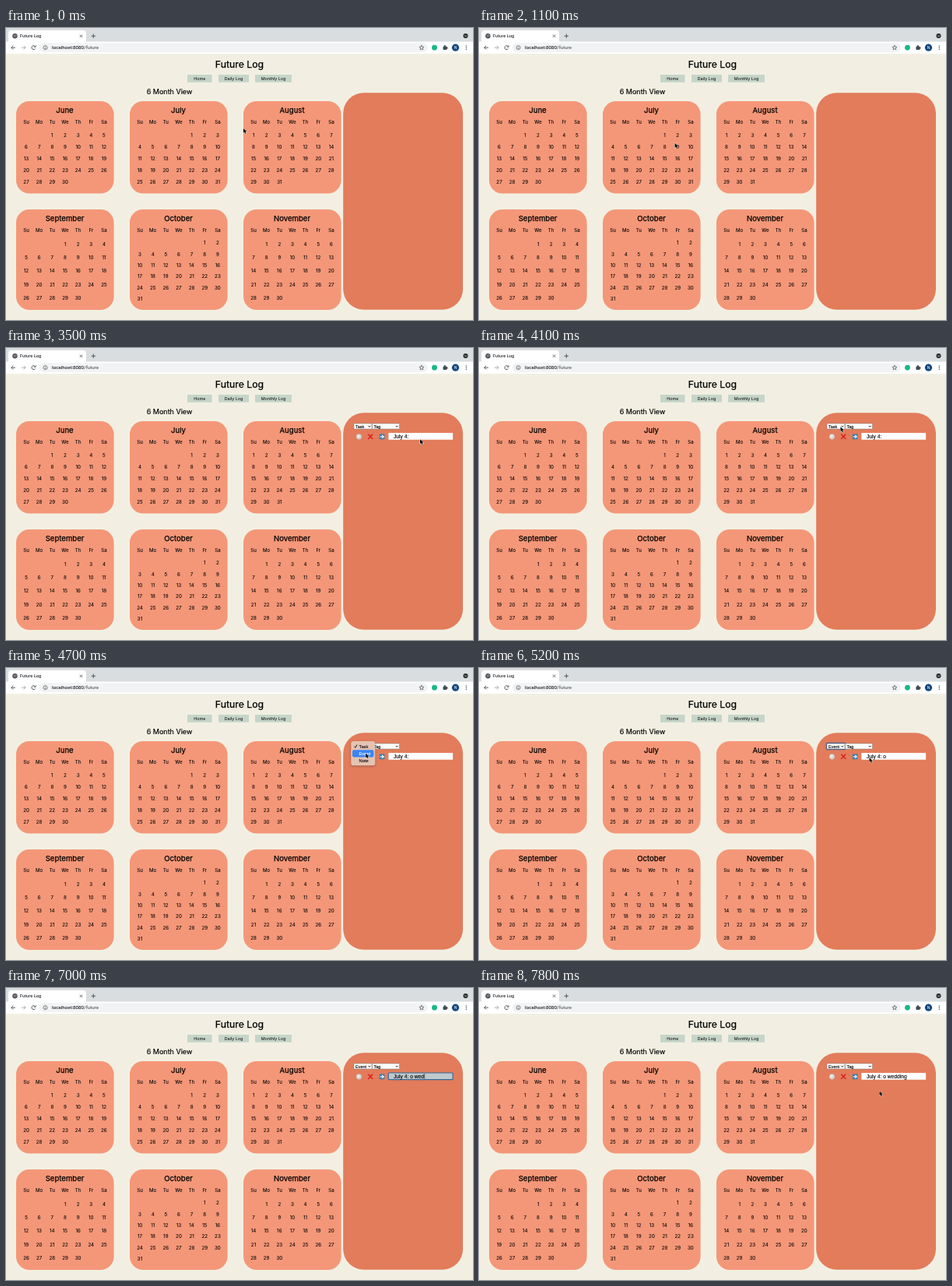
Animation, 600 px wide and 375 px high, one loop 8000 ms. Source, as an HTML page with a canvas:

```html
<!DOCTYPE html>
<html lang="en">
<head>
<meta charset="utf-8">
<title>Future Log</title>
<style>
html, body { margin: 0; width: 100%; height: 100%; overflow: hidden; background: #f2efe2; }
canvas { display: block; width: 600px; height: 375px; }
</style>
</head>
<body>
<canvas id="stage"></canvas>
<script>
const canvas = document.getElementById('stage');
const c = canvas.getContext('2d');
const ratio = window.devicePixelRatio || 1;
canvas.width = 600 * ratio;
canvas.height = 375 * ratio;

const LOOP = 8000, STEP = 100;
const PAGE = 'Inter, sans-serif';
const UI = '"Liberation Sans", Arial, sans-serif';
const CHROME = 'Roboto, sans-serif';

function box(x, y, w, h, r, fill, stroke, lw = 0.5) {
  c.beginPath();
  c.roundRect(x, y, w, h, r);
  if (fill) { c.fillStyle = fill; c.fill(); }
  if (stroke) { c.strokeStyle = stroke; c.lineWidth = lw; c.stroke(); }
}

function disc(x, y, r, fill) {
  c.beginPath();
  c.arc(x, y, r, 0, Math.PI * 2);
  c.fillStyle = fill;
  c.fill();
}

function line(points, color, lw = 0.9) {
  c.beginPath();
  points.forEach(([x, y]) => c.lineTo(x, y));
  c.strokeStyle = color;
  c.lineWidth = lw;
  c.stroke();
}

// y is the baseline; weight adds a thin outline
function text(s, x, y, size, font, { align = 'left', color = '#000', weight = 0 } = {}) {
  c.font = `${size}px ${font}`;
  c.textAlign = align;
  c.fillStyle = color;
  c.fillText(s, x, y);
  if (weight) {
    c.strokeStyle = color;
    c.lineWidth = weight;
    c.strokeText(s, x, y);
  }
}

const centered = { align: 'center', weight: 0.08 };
const heading = { align: 'center', weight: 0.25 };
const bold = { weight: 0.12 };

function drawBrowser() {
  const ink = '#484c50';
  box(0, 0, 600, 18, 0, '#d9dddf');
  box(3, 3, 100, 18, 4, '#fff');
  box(0, 17.5, 600, 15.5, 0, '#fff');
  disc(11.5, 10.3, 3.2, '#4d5156');
  line([[9.5, 9], [11.5, 10], [11, 12]], '#c4c7ca', 0.7);
  line([[12, 8.2], [13.6, 10.6]], '#c4c7ca', 0.7);
  text('Future Log', 17.8, 12.3, 5.8, CHROME, { color: '#2c3033', weight: 0.1 });
  line([[94.8, 8.6], [98.2, 12]], ink, 0.8);
  line([[98.2, 8.6], [94.8, 12]], ink, 0.8);
  line([[109.6, 10.3], [115, 10.3]], ink);
  line([[112.3, 7.6], [112.3, 13]], ink);
  disc(590.5, 10, 3.1, '#2b3033');
  line([[589.2, 9.6], [590.5, 11], [591.8, 9.6]], '#e4e7e8', 0.8);

  line([[12, 25.2], [6.8, 25.2]], ink);
  line([[9.2, 22.8], [6.8, 25.2], [9.2, 27.6]], ink);
  line([[20, 25.2], [25.2, 25.2]], '#a4a8ac');
  line([[22.8, 22.8], [25.2, 25.2], [22.8, 27.6]], '#a4a8ac');
  c.beginPath();
  c.arc(35.5, 25.2, 2.5, 0.5, 5.6);
  c.strokeStyle = ink;
  c.lineWidth = 0.9;
  c.stroke();
  line([[38.2, 22.2], [38.2, 24.4], [36, 24.4]], ink, 0.8);

  box(43, 19.3, 499, 12, 6, '#f1f3f4');
  c.beginPath();
  c.arc(50.5, 25.2, 2.5, 0, 7);
  c.strokeStyle = ink;
  c.lineWidth = 0.7;
  c.stroke();
  line([[50.5, 24.8], [50.5, 26.8]], ink, 0.7);
  disc(50.5, 23.7, 0.4, ink);
  text('localhost:8080', 59, 27.4, 6.25, CHROME, { color: '#202124', weight: 0.1 });
  const host = c.measureText('localhost:8080').width;
  text('/future', 59 + host, 27.4, 6.25, CHROME, { color: '#5c6064', weight: 0.1 });

  c.beginPath();
  for (let i = 0; i < 10; i++) {
    const a = i * Math.PI / 5 - Math.PI / 2, r = i % 2 ? 1.4 : 3.2;
    c.lineTo(534 + r * Math.cos(a), 25.3 + r * Math.sin(a));
  }
  c.closePath();
  c.strokeStyle = ink;
  c.lineWidth = 0.7;
  c.stroke();
  disc(550.5, 25.2, 3.4, '#15b981');
  box(561.5, 23.4, 4.9, 4.7, 0.7, ink);
  disc(563.8, 23.1, 1.1, ink);
  disc(566.6, 25.7, 1.1, ink);
  disc(577.5, 25.2, 4.6, '#11477f');
  text('N', 577.5, 27.1, 5.2, CHROME, { align: 'center', color: '#fff' });
  for (const y of [23, 25.2, 27.4]) disc(591.3, y, 0.7, ink);
}

function button(label, x, w) {
  box(x, 60, w, 9.8, 0, '#c5d5c9');
  text(label, x + w / 2, 66.9, 5.4, PAGE, { align: 'center' });
}

// first: weekday of the 1st, counted from Sunday
function month(name, col, row, first, days) {
  const x = 13 + col * 146, y = row ? 233 : 94;
  const weeks = Math.ceil((first + days) / 7);
  const top = row ? (weeks > 5 ? 43 : 44.8) : 44;
  const gap = row ? (weeks > 5 ? 14.4 : 17.2) : 15;
  const colX = i => x + 13 + i * 16.65;
  box(x, y, 125.6, row ? 129 : 118.5, 17, '#f49778');
  text(name, x + 62.5, y + 15.1, 9.6, PAGE, heading);
  ['Su', 'Mo', 'Tu', 'We', 'Th', 'Fr', 'Sa'].forEach((d, i) =>
    text(d, colX(i), y + 29.1, 6.1, PAGE, centered));
  for (let d = 1; d <= days; d++) {
    const cell = first + d - 1;
    text(d, colX(cell % 7), y + top + 2.2 + gap * Math.floor(cell / 7), 6.2, PAGE, centered);
  }
}

function drawPage() {
  box(0, 33, 600, 342, 0, '#f2efe2');
  text('Future Log', 300, 50.7, 12.3, PAGE, heading);
  button('Home', 233, 31.5);
  button('Daily Log', 273, 39);
  button('Monthly Log', 320, 47);
  text('6 Month View', 210, 85.1, 9, PAGE, { align: 'center', weight: 0.18 });
  month('June', 0, 0, 2, 30);
  month('July', 1, 0, 4, 31);
  month('August', 2, 0, 0, 31);
  month('September', 0, 1, 3, 30);
  month('October', 1, 1, 5, 31);
  month('November', 2, 1, 1, 30);
  box(433.2, 83.2, 153.8, 278.6, 26.5, '#e27c5b');
}

function select(label, x, w, focused) {
  if (focused) box(x - 0.7, 96.3, w + 1.4, 8.4, 1, null, '#1b4f9c', 1);
  box(x, 97, w, 7, 0.5, '#fff', '#777');
  text(label, x + 2, 102.5, 5.5, UI, bold);
  const r = x + w - 3.2;
  line([[r - 1.5, 99.8], [r, 101.4], [r + 1.5, 99.8]], '#111', 0.9);
}

function drawIcons() {
  const g = c.createRadialGradient(452.7, 113, 0.5, 453.5, 114, 3.7);
  g.addColorStop(0, '#f2f0ee');
  g.addColorStop(1, '#c3bfbd');
  disc(453.5, 113.8, 3.6, g);
  c.lineCap = 'round';
  line([[465.6, 111.1], [470.8, 116.5]], '#dd1e22', 1.5);
  line([[470.8, 111.1], [465.6, 116.5]], '#dd1e22', 1.5);
  c.lineCap = 'butt';
  box(479.8, 110.6, 6.6, 6.6, 1, '#3a7ca9');
  line([[480.7, 113.9], [484.5, 113.9]], '#fff', 1.2);
  line([[483.2, 111.9], [485.3, 113.9], [483.2, 115.9]], '#fff', 1.1);
}

const typed = [
  [5100, 'July 4: o'], [6200, 'July 4: o '], [6400, 'July 4: o w'], [6500, 'July 4: o we'],
  [7000, 'July 4: o wed'], [7100, 'July 4: o wedd'], [7200, 'July 4: o weddi'],
  [7300, 'July 4: o weddin'], [7500, 'July 4: o wedding']
];

function drawEntry(t) {
  const focused = t >= 6000 && t < 7600;
  const value = typed.reduce((now, [at, s]) => t >= at ? s : now, 'July 4:');
  if (focused) box(491.3, 109, 82.8, 8.7, 1, '#bfc9cc', '#35689a', 1.2);
  else box(491.4, 108.9, 82.7, 8.8, 0, '#fff');
  text(value, 498, 115.5, 6.7, UI, bold);
  if (focused) {
    const x = 498.6 + c.measureText(value).width;
    line([[x, 110.2], [x, 116.6]], '#111', 0.6);
  }
}

function drawMenu(t) {
  c.save();
  c.shadowColor = 'rgba(0,0,0,.3)';
  c.shadowBlur = 3 * ratio;
  c.shadowOffsetY = ratio;
  box(443.3, 94, 31, 31.3, 3, '#e5c3b3');
  c.restore();
  const active = t >= 4600 ? 1 : 0;
  box(445, 95.9 + active * 9.3, 27.4, 9.2, 2, '#3a84f5');
  ['Task', 'Event', 'Note'].forEach((s, i) =>
    text(s, 453.5, 102.5 + i * 9.3, 5.8, UI, { ...bold, color: i === active ? '#fff' : '#111' }));
  line([[447.4, 100.8], [448.7, 102.3], [451, 98.5]], active ? '#111' : '#fff', 1);
}

// time, x, y of the pointer tip
const path = [
  [0, 305, 129], [500, 290, 137], [700, 290, 137], [1600, 198, 163], [2200, 174, 153.5],
  [2700, 174, 153.5], [3400, 531, 116.5], [3600, 533, 118], [4200, 459, 100],
  [4500, 460, 102], [4700, 462, 109.5], [5000, 462, 110], [5400, 541, 120.5],
  [5800, 538.5, 118], [7500, 538.5, 118], [7800, 514.5, 132.5], [LOOP, 514.5, 132.5]
];

function pointerAt(t) {
  const i = path.findIndex(p => p[0] > t);
  const [t0, x0, y0] = path[i - 1], [t1, x1, y1] = path[i];
  const u = (t - t0) / (t1 - t0), k = u * u * (3 - 2 * u);
  return [x0 + (x1 - x0) * k, y0 + (y1 - y0) * k];
}

function drawPointer(t) {
  if (t >= 6200 && t < 7600) return;
  const [x, y] = pointerAt(t);
  c.beginPath();
  [[0, 0], [0, 5.8], [1.4, 4.6], [2.4, 6.8], [3.5, 6.3], [2.5, 4.2], [4.3, 4.1]]
    .forEach(([dx, dy]) => c.lineTo(x + dx, y + dy));
  c.closePath();
  c.strokeStyle = '#fff';
  c.lineWidth = 0.9;
  c.stroke();
  c.fillStyle = '#000';
  c.fill();
}

function draw(t) {
  c.setTransform(ratio, 0, 0, ratio, 0, 0);
  drawBrowser();
  drawPage();
  if (t >= 2800) {
    select(t >= 5100 ? 'Event' : 'Task', 447, 23, t >= 4300 && t < 5600);
    select('Tag', 470.5, 35, false);
    drawIcons();
    drawEntry(t);
    if (t >= 4300 && t < 5100) drawMenu(t);
  }
  drawPointer(t);
}

const start = performance.now();
function tick() {
  const t = (performance.now() - start) % LOOP;
  draw(Math.floor(t / STEP) * STEP);
  requestAnimationFrame(tick);
}
tick();
</script>
</body>
</html>
```
